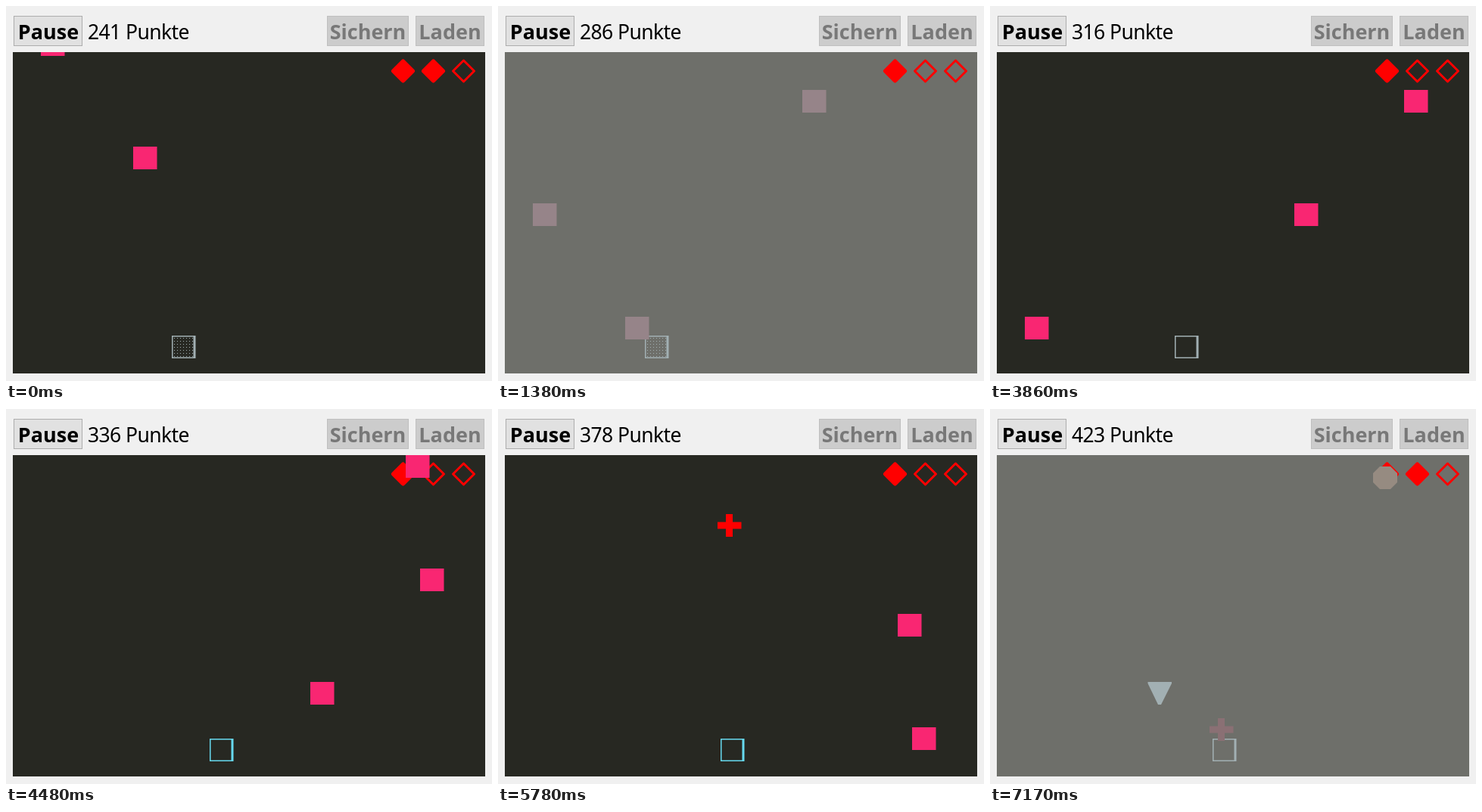
Animation of 642 by 496 pixels, one loop 8 s. Source, as an HTML page:

```html
<!DOCTYPE html>
<html lang="de">
<head>
<meta charset="utf-8">
<title>Ausweichspiel</title>
<style>
  html, body { margin: 0; width: 100%; height: 100%; overflow: hidden; background: #f0f0f0; }
  svg { display: block; }
  text { font: 26.5px "Noto Sans", "Open Sans", sans-serif; }
  .label { font-weight: 700; font-size: 27px; text-anchor: middle; }
  #score { letter-spacing: -0.6px; }
  .off rect { fill: #ccc; stroke: #bfbfbf; }
  .off text { fill: #787878; }
</style>
</head>
<body>
<svg width="642" height="496" viewBox="0 0 642 496">
  <defs><clipPath id="clip"><rect x="9" y="61" width="624" height="425"/></clipPath></defs>
  <g>
    <rect x="10.5" y="13.5" width="90" height="39" fill="#e1e1e1" stroke="#adadad"/>
    <text class="label" x="56" y="44">Pause</text>
  </g>
  <text id="score" x="108" y="44"></text>
  <g class="off">
    <rect x="424.5" y="13.5" width="107" height="39"/>
    <text class="label" x="478" y="44">Sichern</text>
  </g>
  <g class="off">
    <rect x="541.5" y="13.5" width="90" height="39"/>
    <text class="label" x="586.5" y="44">Laden</text>
  </g>
  <rect id="field" x="9" y="61" width="624" height="425"/>
  <g id="board" clip-path="url(#clip)"></g>
</svg>
<script>
const LOOP = 8000, STEP = 76.9, TICKS_PER_STEP = 2.5;
const HIT = 1380, RESUME = 2940, BONUS = 7170;
const SPAWN_Y = 31;
const GREY = '#a2b0b3', CYAN = '#66d9ef';

// Shapes have their top left corner at 0,0; speed is in pixels per tick.
const KINDS = {
  block: { d: 'M0 0H31.5V30H0Z', speed: 5, color: '#f92672', dim: '#968489' },
  cross: { d: 'M11 0H20V10.5H31.5V19.5H20V30H11V19.5H0V10.5H11Z', speed: 6, color: '#ff0000', dim: '#8a7074' },
  arrow: { d: 'M0 0H31.5V2L17.5 30H13.5L0 2Z', speed: 10, color: CYAN, dim: GREY },
  octagon: { d: 'M9 0H23L32 9V21L23 30H9L0 21V9Z', speed: 15, color: '#fd971f', dim: '#968b81' }
};

// kind, x, tick of spawning
const ITEMS = [
  ['block', 168, 210], ['block', 46, 240], ['block', 402, 270],
  ['block', 547, 300], ['block', 528, 330], ['cross', 290, 360],
  ['arrow', 208.5, 390], ['octagon', 506, 420]
];

// tick, player x
const MOVES = [
  [241, 219], [251, 244], [266, 219], [278, 194], [297, 219],
  [306, 244], [328, 269], [338, 294], [348, 319], [375, 294]
];

const byId = id => document.getElementById(id);
const board = byId('board'), field = byId('field'), score = byId('score');

function set(node, attrs) {
  for (const key in attrs) node.setAttribute(key, attrs[key]);
  return node;
}

function add(parent, tag, attrs) {
  return parent.appendChild(set(document.createElementNS('http://www.w3.org/2000/svg', tag), attrs));
}

const lives = [524.5, 564.5, 604.5].map(x => add(board, 'path', {
  transform: `translate(${x} 86)`, stroke: '#f00', 'stroke-linejoin': 'round'
}));

const player = add(board, 'g', {});
add(player, 'path', { d: 'M0 0H31.5V30H0ZM1.5 1.5V28.5H28.5V1.5Z', 'fill-rule': 'evenodd' });
let dotPath = '';
for (let i = 0; i < 49; i++) dotPath += `M${3 + i % 7 * 4} ${3 + Math.floor(i / 7) * 4}h1v1h-1z`;
const dots = add(player, 'path', { d: dotPath });

const items = ITEMS.map(([name, x, born]) => {
  const kind = KINDS[name];
  return { kind, x, born, node: add(board, 'path', { d: kind.d }) };
});

function tickAt(t) {
  const steps = time => Math.floor((time + 5) / STEP);
  return t < RESUME
    ? Math.floor(241 + TICKS_PER_STEP * steps(Math.min(t, HIT)))
    : Math.floor(286 + TICKS_PER_STEP * steps(Math.min(t, BONUS) - RESUME));
}

function drawLife(node, full) {
  const r = full ? 12.5 : 14;
  set(node, {
    d: `M0 ${-r}L${r} 0L0 ${r}L${-r} 0Z`,
    fill: full ? '#f00' : 'none',
    'stroke-width': full ? 6 : 3
  });
}

function draw(t) {
  const tick = tickAt(t);
  const paused = t >= HIT && t < RESUME || t >= BONUS;
  const lifeCount = t >= HIT && t < BONUS ? 1 : 2;

  score.textContent = `${tick} Punkte`;
  set(field, { fill: paused ? '#6e6f6a' : '#272822' });
  lives.forEach((node, i) => drawLife(node, i < lifeCount));

  const x = MOVES.filter(move => move[0] <= tick).pop()[1];
  set(player, { transform: `translate(${x} 436)`, fill: paused || tick < 336 ? GREY : CYAN });
  set(dots, { visibility: tick < 301 ? 'visible' : 'hidden' });

  for (const { kind, x, born, node } of items) {
    const y = SPAWN_Y + (tick - born) * kind.speed;
    set(node, {
      transform: `translate(${x} ${y})`,
      fill: paused ? kind.dim : kind.color,
      visibility: tick >= born && y < 486 ? 'visible' : 'hidden'
    });
  }
}

const start = performance.now();
function frame() {
  draw((performance.now() - start) % LOOP);
  requestAnimationFrame(frame);
}
frame();
</script>
</body>
</html>
```
